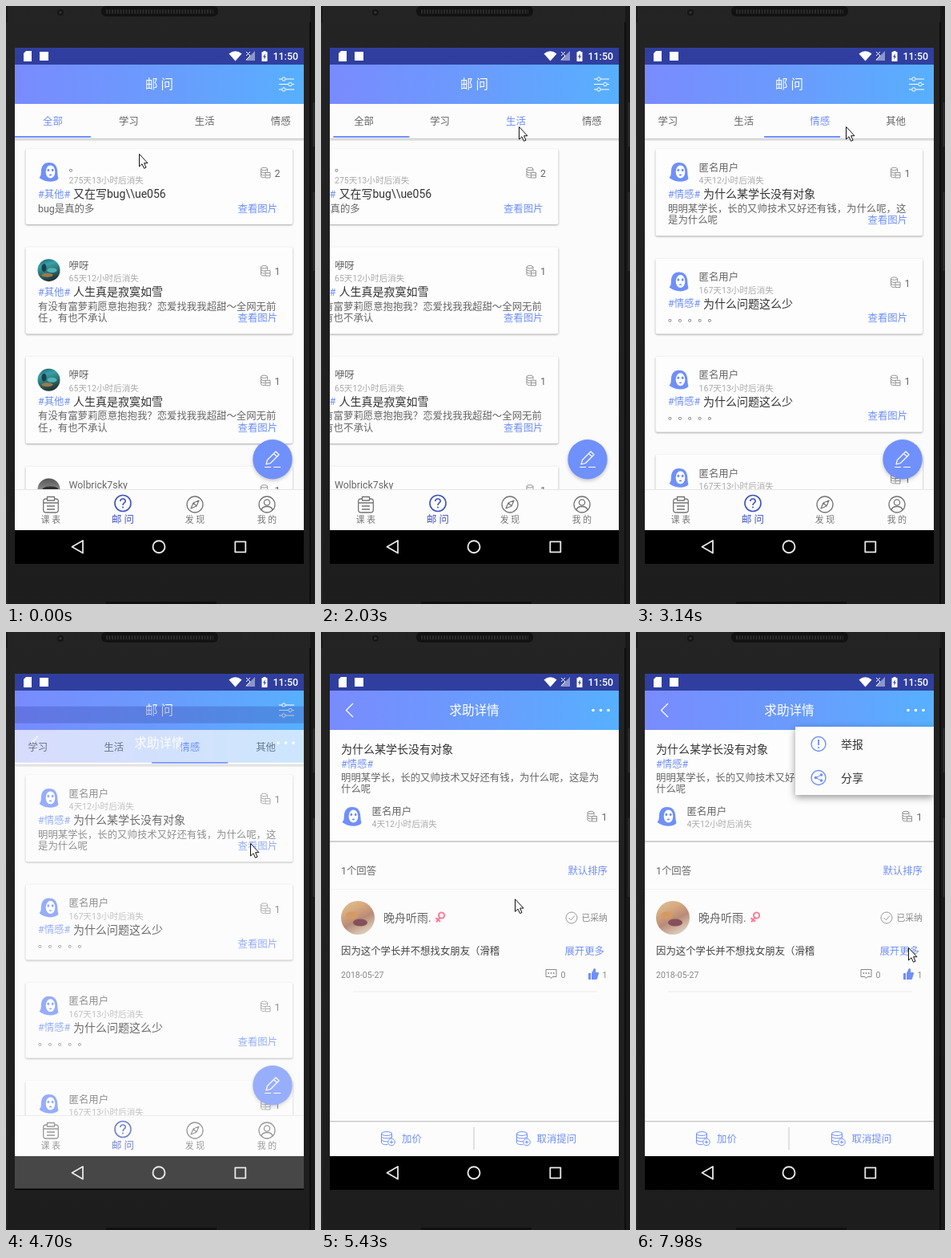
Animation of 386x745 px, one loop 8 s. Source, as an HTML page:

```html
<!DOCTYPE html>
<html lang="zh-CN">
<head>
<meta charset="utf-8">
<style>
html, body { margin: 0; width: 100%; height: 100%; overflow: hidden; background: #111 }
svg { display: block; width: 386px; height: 745px; font-family: Roboto, 'Noto Sans CJK SC', 'Noto Sans CJK', sans-serif; text-spacing-trim: space-all }
text { white-space: pre }
.card { fill: #fdfdfd; filter: drop-shadow(0 1px 1px rgba(0,0,0,.34)) }
.menu { fill: #fcfcfc; filter: drop-shadow(0 3px 5px rgba(0,0,0,.4)) }
.fab { filter: drop-shadow(0 2px 2px rgba(0,0,0,.22)) }
</style>
</head>
<body>
<svg id="stage" viewBox="0 0 386 745"></svg>
<script>
const BLUE = '#6f8ffa', INK = '#333', GREY = '#666', PALE = '#aaa', TAB_W = 94.9;

// y is the middle of the line
const text = (x, y, size, str, fill = GREY, anchor = 'start', weight = 400) =>
  `<text x="${x}" y="${y + size * .37}" font-size="${size}" fill="${fill}" text-anchor="${anchor}" font-weight="${weight}">${str}</text>`;
const rect = (x, y, w, h, fill, more = '') => `<rect x="${x}" y="${y}" width="${w}" height="${h}" fill="${fill}" ${more}/>`;
const disc = (x, y, r, fill, more = '') => `<circle cx="${x}" cy="${y}" r="${r}" fill="${fill}" ${more}/>`;
const oval = (x, y, rx, ry, fill) => `<ellipse cx="${x}" cy="${y}" rx="${rx}" ry="${ry}" fill="${fill}"/>`;
const line = (d, stroke, width = 1, more = '') =>
  `<path d="${d}" fill="none" stroke="${stroke}" stroke-width="${width}" stroke-linejoin="round" ${more}/>`;
const shape = (d, fill) => `<path d="${d}" fill="${fill}"/>`;
const ring = (x, y, r, stroke, width = 1.2) => disc(x, y, r, 'none', `stroke="${stroke}" stroke-width="${width}"`);
const at = (x, y, body, scale = 1) => `<g transform="translate(${x} ${y}) scale(${scale})">${body}</g>`;
const group = (id, body, more = '') => `<g id="${id}" ${more}>${body}</g>`;
const gradient = (id, colors, dir = 'x2="1" y2="0"') => `<linearGradient id="${id}" ${dir}>` +
  colors.map((c, i) => `<stop offset="${i / (colors.length - 1)}" stop-color="${c}"/>`).join('') + '</linearGradient>';
const clip = (id, x, y, w, h) => `<clipPath id="${id}">${rect(x, y, w, h, '#000')}</clipPath>`;

const coins = color => line('M-5.5 -5a4 1.7 0 1 0 8 0a4 1.7 0 1 0 -8 0V4C-5.5 5.5 -2.5 6 -.5 5.8M-5.5 -2C-5 0 -1 0 0 -.3M-5.5 1C-5 3 -2 3 -1 2.7M2.5 -5V-1.5', color, .9) +
  line('M0 -.5H6V6H0ZM0 2.7H6', color, .9);
const coinsPlus = color => line('M-8 -6a6.5 2.4 0 1 0 13 0a6.5 2.4 0 1 0 -13 0V5C-8 7.5 -3 8 0 7.5M-8 -2.3C-7 .5 4 .5 5 -2.3M-8 1.4C-7 3.7 -3 4 -.5 3.7M5 -6V-.5', color) +
  ring(4.5, 4.5, 4.3, color, 1) + line('M2.3 4.5H6.7M4.5 2.3V6.7', color);

// faces are drawn in a circle of radius 14
const faces = {
  ghost: shape('M-12 7C-9 4 -10 1 -9.5 -3C-8.5 -9 -5 -12 0 -12C6 -12 9.5 -9 10.5 -3C11 1 11 5 12 8C8 13 -3 13.5 -12 7Z', BLUE) +
    oval(2, -.5, 5.8, 8, '#fff') + oval(-.7, -2.5, 1.4, 1.8, BLUE) + oval(4.7, -2.5, 1.4, 1.8, BLUE) + oval(2, 3.5, 1.7, .9, BLUE),
  sea: disc(0, 0, 14, 'url(#sea)') + oval(4, 0, 6, 3, '#4fb3b5') + oval(-2, 6, 7, 2.5, '#9a7a4c') + oval(-6, -3, 3, 5, '#17404d'),
  fur: disc(0, 0, 14, 'url(#fur)') + oval(2, 2, 6.5, 5.5, '#b7a89d') + oval(-8, 2, 4, 7, '#4b413b') + disc(0, 1, 1.2, '#2e2824') + disc(5, 1, 1.2, '#2e2824'),
  dusk: disc(0, 0, 14, 'url(#dusk)') + oval(2, 0, 10, 4, '#2c2c2c'),
  warm: disc(0, 0, 14, 'url(#warm)') + oval(2, 4, 6, 3, '#84505a') + oval(-5, -2, 5, 3, '#d59a63')
};
const avatar = (kind, x, y, r = 14) => at(x, y, faces[kind], r / 14);

const BUSY = ['sea', '咿呀', '65天12小时后消失', '其他', '人生真是寂寞如雪',
  ['有没有富萝莉愿意抱抱我？恋爱找我我超甜～全网无前', '任，有也不承认'], 1];
const ANON = '匿名用户';
const SHORT = ['ghost', ANON, '167天13小时后消失', '情感', '为什么问题这么少', ['。。。。。'], 1];
const life = (days, title, body) => ['fur', '木禾', days + '天13小时后消失', '生活', title, [body], 1];
const pages = {
  0: [['ghost', '。', '275天13小时后消失', '其他', '又在写bug\\\\ue056', ['bug是真的多'], 2], BUSY, BUSY,
    ['dusk', 'Wolbrick7sky', '65天12小时后消失', '其他', '', [''], 1]],
  2: [life(96, '232323', '2323'), life(5, 'tiwen zuohao l', 'lei a leia'),
    life(96, '2323232', '3232323'), life(96, 'bug好多不想改了', '')],
  3: [['ghost', ANON, '4天12小时后消失', '情感', '为什么某学长没有对象',
    ['明明某学长，长的又帅技术又好还有钱，为什么呢，这', '是为什么呢'], 1], SHORT, SHORT, SHORT]
};

function card([face, name, left, tag, title, body, price], y) {
  const last = 74 + (body.length - 1) * 14.3;
  return at(0, y, rect(24.5, 0, 333.5, last + 20, '', 'rx="2" class="card"') +
    avatar(face, 53.5, 29) + text(78.5, 23, 12.4, name) + text(78.5, 39, 10.6, left, PALE) +
    at(324, 30, coins('#888')) + text(335.5, 30.5, 12.4, price) +
    text(40, 56, 12.4, `#${tag}#`, BLUE) + text(84, 56, 14, title, INK) +
    body.map((s, i) => text(40, 74 + i * 14.3, 12.4, s)).join('') +
    text(289.5, last, 12.4, '查看图片', BLUE));
}
function page(index) {
  let y = 178;
  return at(index * 361, 0, pages[index].map(c => {
    const out = card(c, y);
    y += c[5].length > 1 ? 136.6 : 122.2;
    return out;
  }).join(''));
}

const frame = rect(0, 0, 386, 745, '#191919') + rect(2, -30, 378, 805, 'url(#body)', 'rx="26"') +
  line('M1 20V745', '#333') + line('M380 20V745', '#0e0e0e', 2) + line('M384.5 120V175M384.5 232V330', '#2c2c2c', 2) +
  disc(68, 8, 4, '#151515') + disc(68, 8, 1.8, '#333') +
  rect(119, 0, 146, 13, '#121212', 'rx="6"') + line('M125 7H259', '#2c2c2c', 5, 'stroke-dasharray="2 1.5"') +
  line('M125 744H263', '#101010', 4);

const header = rect(11, 52, 361, 21, '#303f9f') + rect(11, 73, 361, 49, 'url(#bar)');
const filterIcon = [[91, 347], [97.5, 355], [104, 347]].map(([y, x]) =>
  line(`M341 ${y}H${x - 2.3}M${x + 2.3} ${y}H360`, '#fff') + ring(x, y, 2.2, '#fff', 1)).join('');

const tabs = rect(11, 122, 361, 43, '#fcfcfc') + rect(11, 165, 361, 1, '#c9c9c9') + rect(11, 166, 361, 2, '#e3e3e3') +
  group('tabs', ['全部', '学习', '生活', '情感', '其他'].map((s, i) =>
    text(11 + TAB_W * (i + .5), 143, 12.4, s, GREY, 'middle')).join('') +
    rect(11, 162, TAB_W, 2, BLUE, 'id="mark"'));

const fab = disc(333, 564.7, 24.7, '#7090fc', 'class="fab"') +
  line('M325 571L326.5 565.5L337 555L341 559L330.5 569.5ZM334.5 557.5L338.5 561.5M323 574.5H331M334 574.5H343', '#fff', 1.2);

const navItem = (x, label, icon, on) => {
  const c = on ? '#4054c0' : '#757575';
  return icon(x, c) + text(x, on ? 639 : 640, on ? 12.4 : 10.8, label, c, 'middle');
};
const bottomNav = rect(11, 602, 361, 51, '#fcfcfc') + rect(11, 602, 361, 1, '#e6e6e6') +
  navItem(56, '课 表', (x, c) => at(x, 621, line('M-5 -7H-6Q-9.3 -7 -9.3 -4V7Q-9.3 10 -6 10H6Q9.3 10 9.3 7V-4Q9.3 -7 6 -7H5M-4.5 -9.5H4.5V-5H-4.5ZM-9 -2H9M-5 2H5M-5 6H5', c, 1.3))) +
  navItem(146, '邮 问', (x, c) => ring(x, 619.5, 10, c, 1.6) +
    line('M142.8 617Q142.8 614 146 614T149.2 617C149.2 619 146 619 146 622', c, 1.6) + disc(x, 624.6, 1, c), true) +
  navItem(236, '发 现', (x, c) => ring(x, 621, 10, c, 1.3) +
    line('M241 616L238 623L231 626L234 619ZM234 619L238 623', c, 1.2)) +
  navItem(326, '我 的', (x, c) => ring(x, 621, 10, c, 1.3) + ring(x, 618.5, 3.6, c, 1.3) +
    line('M319 628Q320 623.5 326 623.5T333 628', c, 1.3));

const home = header + text(191.5, 97.5, 15.5, '邮 问', '#fff', 'middle') + filterIcon +
  rect(11, 122, 361, 531, '#fbfbfb') +
  `<g clip-path="url(#list)">${group('pager', [0, 2, 3].map(page).join(''))}</g>` + tabs + fab + bottomNav;

const question = rect(11, 122, 361, 139, '#fdfdfd') + rect(11, 260, 361, 2, '#cfcfcf') +
  text(25, 146, 14, '为什么某学长没有对象', INK) + text(25, 164, 12.4, '#情感#', BLUE) +
  text(25, 181, 12.4, '明明某学长，长的又帅技术又好还有钱，为什么呢，这是为') + text(25, 195.3, 12.4, '什么呢') +
  avatar('ghost', 38.5, 230) + text(63.5, 223, 12.4, ANON) + text(63.5, 239, 10.6, '4天12小时后消失', PALE) +
  at(338.5, 230, coins('#888')) + text(350.5, 230.5, 12.4, '1') +
  rect(11, 609, 361, 1.3, '#c4c4c4') + rect(190.5, 617, 1, 28, '#c4c4c4') +
  at(83.5, 631, coinsPlus(BLUE)) + text(101, 631.5, 12.4, '加价', BLUE) +
  at(252.5, 631, coinsPlus(BLUE)) + text(269.5, 631.5, 12.4, '取消提问', BLUE);

const female = `<g transform="translate(149 355) rotate(38)">${ring(0, -2.5, 3.6, '#ff7896', 2)}${line('M0 1V8M-3.5 4.5H3.5', '#ff7896', 2)}</g>`;
const answer = text(25, 297, 12.4, '1个回答') + text(358, 297, 12.4, '默认排序', BLUE, 'end') + rect(11, 320, 361, 1, '#f2f2f2') +
  avatar('warm', 46, 356, 21) + text(78, 356, 14, '晚舟听雨.') + female +
  ring(313, 356, 7, '#999', 1) + line('M309.5 356L312.3 358.8L317 353.5', '#999') + text(325.5, 356, 10.8, '已采纳', '#888') +
  text(25, 397, 12.4, '因为这个学长并不想找女朋友（滑稽', '#444') + text(354, 397, 12.4, '展开更多', BLUE, 'end') +
  text(25, 427, 10.6, '2018-05-27', '#888') +
  line('M281 420.5H294V429.5H289L287.5 431.5L286 429.5H281Z', '#888') +
  [284.3, 287.5, 290.7].map(x => disc(x, 425, .9, '#888')).join('') + text(299.5, 427, 10.6, '0', '#888') +
  rect(334, 425, 3, 8, BLUE) + shape('M338 425L341 419Q344 419 343 424H346.5Q347.3 424.3 346.8 426L345 432Q344.7 433 343.5 433H338Z', BLUE) +
  text(351.5, 427, 10.6, '1', '#888') + rect(40, 447.5, 305, 1, '#eee');

const detail = rect(11, 52, 361, 601, '#fcfcfc') + header +
  text(191.5, 97.5, 15.6, '求助详情', '#fff', 'middle') + line('M40 89L31.5 97.5L40 106', '#fff', 1.2) +
  [340, 349.5, 359].map(x => disc(x, 97.5, 1.8, '#fff')).join('') +
  group('question', question) + group('answer', answer);

const menu = rect(199, 118, 173, 85, '', 'class="menu"') +
  ring(228, 139.5, 9, BLUE, 1.4) + line('M228 134V141', BLUE, 1.8) + disc(228, 144, 1.1, BLUE) + text(256, 140, 14, '举报', INK) +
  ring(228, 181.5, 9, BLUE, 1.4) + line('M231.5 178L224.5 181.5L231.5 185', BLUE) +
  [[231.5, 178], [224.5, 181.5], [231.5, 185]].map(([x, y]) => disc(x, y, 1.8, BLUE)).join('') + text(256, 182, 14, '分享', INK);

const system = shape('M25 56H32V69H22V59Z', '#fff') + rect(42, 57, 11, 11, '#fff') +
  shape('M278.5 59.5Q286.5 53 294.5 59.5L286.5 68.5Z', '#fff') +
  shape('M311 56V68H299Z', '#8d96cb') + line('M300 57L305 62M305 62L300 67M300 62L305 57', '#fff', 1) +
  shape('M321.5 56H324.5V57.3H326.5V69H319.5V57.3H321.5Z', '#fff') + shape('M324 59L321 63.6H322.8L322 67L325 62.4H323.2Z', '#303f9f') +
  text(365, 62.5, 12.4, '11:50', '#fff', 'end', 500) +
  line('M82.5 673.7L96 666V681.5Z', '#e8e8e8', 1.8) + ring(191, 673.7, 7.5, '#e8e8e8', 1.9) +
  line('M286.3 667.3H299.3V680.3H286.3Z', '#e8e8e8', 1.8);

const pointer = '<path d="M.5 .5V16L4 12.8L6.5 18.3L9 17.2L6.6 11.7H11Z" fill="#fff" stroke="#111" stroke-width="1"/>';

const stage = document.getElementById('stage');
stage.innerHTML = '<defs>' + gradient('bar', ['#798bfe', '#6a9bfd', '#57b0ff']) + gradient('body', ['#242424', '#1d1d1d'], 'x2="0" y2="1"') +
  gradient('sea', ['#1b5a68', '#38a0a6', '#2f6f70', '#23393a'], 'x2=".3" y2="1"') +
  gradient('fur', ['#6b6058', '#8d7d72', '#4a3f3a'], 'x2="1" y2="1"') +
  gradient('dusk', ['#555', '#888', '#222'], 'x2="0" y2="1"') +
  gradient('warm', ['#dcc39a', '#d8ab80', '#b98b78', '#d9c7b4'], 'x2=".5" y2="1"') +
  clip('screen', 11, 52, 361, 643) + clip('list', 11, 167, 361, 436) + '</defs>' +
  frame + rect(11, 52, 361, 643, '#000') +
  `<g clip-path="url(#screen)">${home}${group('detail', detail)}${group('menu', menu)}${system}</g>` + group('cursor', pointer);

const el = Object.fromEntries([...stage.querySelectorAll('g[id], #mark')].map(e => [e.id, e]));
const labels = [...el.tabs.querySelectorAll('text')];

const clamp = x => Math.max(0, Math.min(1, x));
const out = (t, start, length, power) => 1 - (1 - clamp((t - start) / length)) ** power;
// keys are [time, value, ...]; linear in between
function track(t, keys, i = 1) {
  const n = keys.findIndex(k => k[0] > t);
  if (n < 0) return keys[keys.length - 1][i];
  if (!n) return keys[0][i];
  const a = keys[n - 1], b = keys[n];
  return a[i] + (b[i] - a[i]) * (t - a[0]) / (b[0] - a[0]);
}
const mouse = [[50, 166, 184], [330, 232, 144], [510, 232, 144], [680, 140, 146], [920, 140, 146], [1270, 211, 148],
  [1370, 365, 168], [1540, 365, 168], [1590, 345, 175], [1720, 247, 150], [2030, 247, 150], [2250, 239, 160],
  [2530, 262, 150], [3200, 262, 150], [3690, 242, 241], [4000, 242, 241], [4390, 305, 263], [4760, 305, 263],
  [5430, 242, 332], [5490, 243, 353], [5530, 249, 362], [5700, 249, 362], [5730, 247, 358], [6090, 247, 358],
  [6770, 352, 111], [7120, 352, 111], [7220, 346, 97], [7380, 346, 97], [7790, 338, 390], [7950, 338, 390], [7980, 340, 393]];
const swipe = [[510, 0], [680, 113.5], [1240, 113.5], [1270, 106], [1370, 0]];

const move = (e, x, y) => e.setAttribute('transform', `translate(${x} ${y})`);
const fade = (e, a) => e.setAttribute('opacity', a);

function draw() {
  const t = performance.now() % 8000;
  const toLife = out(t, 2025, 205, 3), toMood = out(t, 2910, 220, 3);
  move(el.tabs, -(track(t, swipe) + 56.5 * toLife + 57 * toMood), 0);
  move(el.pager, -361 * (2 * toLife + toMood), 0);
  el.mark.setAttribute('x', 11 + TAB_W * (2 * out(t, 2025, 245, 2) + out(t, 2970, 330, 2)));
  const active = t < 2030 ? 0 : t < 2910 ? 2 : 3;
  labels.forEach((l, i) => l.setAttribute('fill', i == active ? BLUE : GREY));

  move(el.detail, 0, 51.4 * (1 - out(t, 4685, 350, 5)));
  fade(el.detail, out(t, 4685, 200, 4));
  fade(el.question, t < 4880 ? 0 : 1);
  fade(el.answer, t < 5120 ? 0 : 1);
  fade(el.menu, out(t, 7250, 200, 2));
  move(el.cursor, track(t, mouse, 1), track(t, mouse, 2));
  requestAnimationFrame(draw);
}
draw();
</script>
</body>
</html>
```
